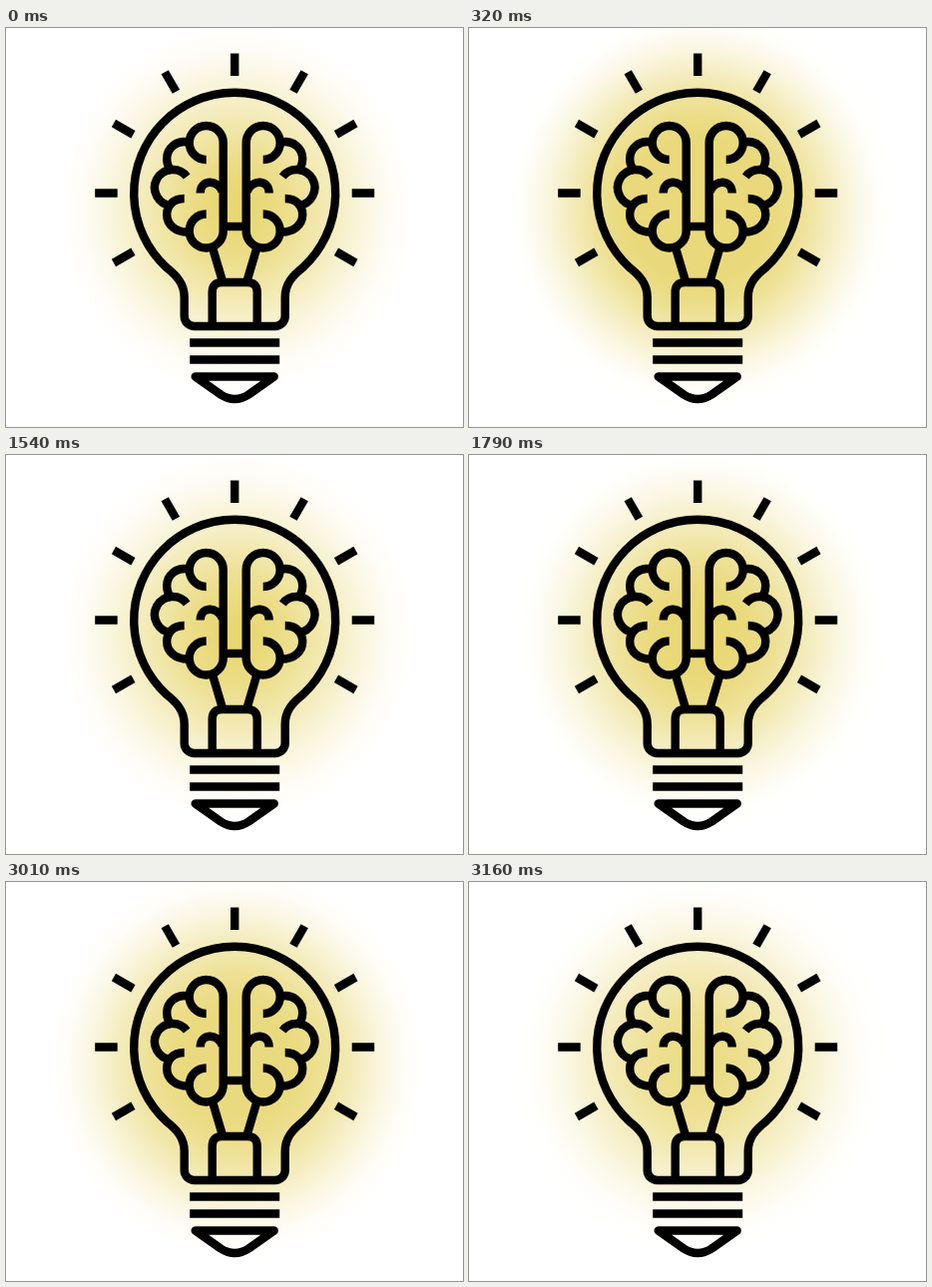
Write an HTML page that moves like this. It is 458 by 400 pixels and loops after 3.24 s.

```html
<!DOCTYPE html>
<html lang="en">
<head>
<meta charset="utf-8">
<title>Idea bulb</title>
<style>
  html, body { margin: 0; width: 100%; height: 100%; overflow: hidden; background: #fff; }
  svg { display: block; width: 458px; height: 400px; }
  .ink { fill: none; stroke: #000; stroke-width: 8.4; stroke-linejoin: round; }
</style>
</head>
<body>
<svg viewBox="0 0 458 400">
  <defs>
    <radialGradient id="glow" gradientUnits="userSpaceOnUse" r="200"
      gradientTransform="translate(231 181) scale(1 1.03)" cx="0" cy="0"></radialGradient>
    <g id="half">
      <path d="M201 132A17 17 0 1 1 218 115V203A17 17 0 1 1 201 186.500"/>
      <path d="M185 115C171 111 161.500 121 161.500 131Q161.500 139 167 144"/>
      <path d="M181.500 149A18 18 0 1 0 166 178"/>
      <path d="M179 171C167 171 161.500 179 161.500 187C161.500 197 170 205 184 204.500"/>
      <path d="M195 165.500C195 152 212 151 217 164"/>
      <path d="M207.500 221L217 253"/>
    </g>
  </defs>
  <rect width="458" height="400" fill="url(#glow)"/>
  <g class="ink" transform="translate(-.3 0)">
    <path id="rays"/>
    <path d="M161 240C171 248 179 256 179 270V289a10 10 0 0 0 10 10H270a10 10 0 0 0 10-10V270C280 256 288 248 298 240A101 101 0 1 0 161 240Z"/>
    <use href="#half"/>
    <use href="#half" transform="translate(459 0) scale(-1 1)"/>
    <path d="M218 199H241"/>
    <path d="M207 299V265Q207 255 217 255H242Q252 255 252 265V299"/>
    <path d="M184.500 315.500H274.500M184.500 332.500H274.500"/>
    <path d="M190 349.500H269L243.500 367.500Q229.500 376.500 215.500 367.500Z"/>
  </g>
</svg>
<script>
  const LOOP = 3240, FADE_STEPS = 4;
  const REACH = 200, STOPS = 20;
  const FADES = [
    { start: 90, step: 76, up: true },
    { start: 1390, step: 50, up: false },
    { start: 1790, step: 73, up: true },
    { start: 3010, step: 75, up: false }
  ];

  const glow = document.getElementById("glow");
  const stops = Array.from({ length: STOPS + 1 }, (_, i) => {
    const stop = document.createElementNS("http://www.w3.org/2000/svg", "stop");
    stop.setAttribute("offset", i / STOPS);
    return glow.appendChild(stop);
  });

  let rays = "";
  for (let k = -4; k <= 4; k++) {
    const a = k * Math.PI / 6;
    const point = r => `${229.5 + r * Math.sin(a)} ${165.5 - r * Math.cos(a)}`;
    rays += `M${point(117.5)}L${point(140)}`;
  }
  document.getElementById("rays").setAttribute("d", rays);

  const tint = s => `rgb(${[24, 42, 147].map(d => Math.round(255 - d * s)).join(",")})`;

  function smoothstep(from, to, x) {
    const p = Math.min(1, Math.max(0, (x - from) / (to - from)));
    return p * p * (3 - 2 * p);
  }

  // The glow widens as it brightens, and pales on the way back
  function glowAt(t) {
    const fade = FADES.findLast(f => f.start <= t);
    if (!fade) return { spread: 0, peak: .96 };
    const k = Math.min(FADE_STEPS, Math.floor((t - fade.start) / fade.step) + 1);
    const part = k / FADE_STEPS;
    const spread = fade.up ? Math.sin(part * Math.PI / 2) : 1 - part;
    const paling = !fade.up && spread > 0;
    return { spread, peak: .9 + (paling ? -.12 : .06) * (1 - spread) };
  }

  function draw(t) {
    const { spread, peak } = glowAt(t);
    stops.forEach((stop, i) => {
      const r = i / STOPS * REACH;
      const s = peak * (1 - smoothstep(65 * spread, 185 + 10 * spread, r));
      stop.setAttribute("stop-color", tint(s));
    });
  }

  const begin = performance.now();
  function tick() {
    draw((performance.now() - begin) % LOOP);
    requestAnimationFrame(tick);
  }
  tick();
</script>
</body>
</html>
```
